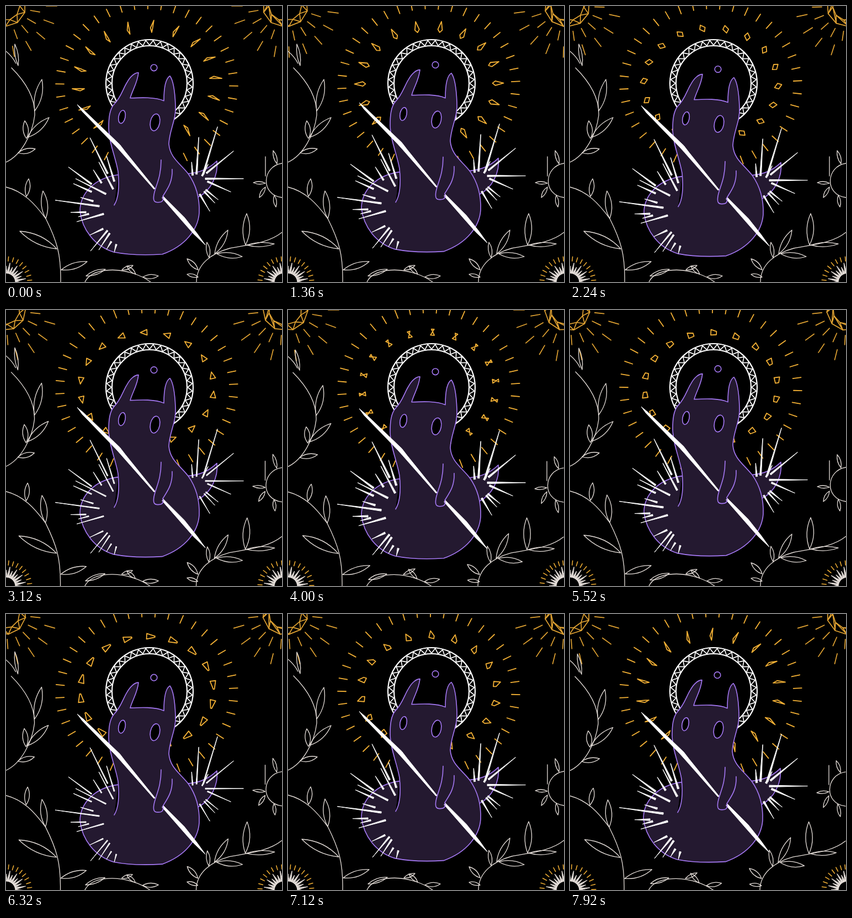
Animation, 500 px wide and 500 px high, one loop 8000 ms. Source, as an HTML page with a canvas:

```html
<!DOCTYPE html>
<html lang="en">
<head>
<meta charset="utf-8">
<title>Horned spirit</title>
<style>
  html, body { margin: 0; width: 100%; height: 100%; overflow: hidden; background: #000; }
  canvas { display: block; width: 500px; height: 500px; }
</style>
</head>
<body>
<canvas id="stage" width="500" height="500"></canvas>
<script>
const ctx = document.getElementById('stage').getContext('2d');
const STEP = 80, STEPS = 100, TAU = Math.PI * 2, DEG = Math.PI / 180;
const GOLD = '#f4b135', WHITE = '#fff', IVORY = '#e6dfda', PURPLE = '#a679f5', FILL = '#241930';

// Each crystal: four corners as [outward, clockwise], reached at the given step.
const crystals = [
  [0, [15, 1], [1, -4], [-7, -1], [1, 0]],
  [17, [14, 0], [-1, -4], [-6, 0], [-1, 4]],
  [39, [0, -6], [0, -6], [-5, 6], [5, 6]],
  [50, [6, -2], [-5, 4], [-5, -3], [6, 3]],
  [69, [5, -5], [-5, -5], [-4, 5], [2, 5]],
  [79, [5, -7], [-5, -7], [-1, 8], [1, 8]],
  [99, [15, 1], [1, -4], [-7, -1], [1, 0]],
  [100, [15, 1], [1, -4], [-7, -1], [1, 0]]
];

const body = new Path2D(`M196 361 C206 345 205 320 203 300 C198 272 187 250 186 222
  C186 205 187 188 196 178 C208 166 212 150 219 139 C225 128 233 121 240 121
  C238 140 230 150 225 167 C245 166 270 165 286 172 C286 155 288 132 297 127
  C303 135 306 155 307 180 C309 205 296 225 295 250 C297 275 315 285 330 304
  C345 325 351 350 350 375 C348 405 325 435 283 450 C250 452 220 451 195 446
  C160 435 138 405 134 372 C134 340 160 312 203 306`);
const tail = new Path2D('M330 304 C355 302 370 293 382 281 C385 305 372 335 347 347');
const arm = new Path2D(`M281 279 C281 312 271 325 268 342 C266 353 269 356 275 356
  C283 356 286 353 284 345 M301 296 C302 320 292 332 284 345`);

const stems = new Path2D(`M0 82 Q12 92 18 104 M10 112 C40 142 53 170 52 198 C48 232 28 270 0 283
  M0 328 C32 336 52 358 72 385 C92 425 100 450 99 500
  M143 500 C155 475 200 474 232 485 Q248 490 262 500
  M345 500 C345 468 372 448 405 439 C440 432 475 430 500 410
  M500 285 C464 290 460 342 500 347 M470 273 L470 308`);
// base x, base y, tip x, tip y, width
const leaves = [
  [22, 108, 16, 69, 6], [52, 190, 65, 133, 13], [37, 240, 34, 208, 10],
  [39, 238, 78, 202, 12], [22, 266, 53, 259, 9],
  [37, 345, 41, 313, 9], [72, 385, 67, 335, 12], [92, 440, 25, 408, 15], [100, 478, 147, 463, 11],
  [180, 477, 145, 489, 8], [210, 478, 230, 470, 6], [235, 486, 219, 471, 6], [248, 491, 276, 489, 8],
  [378, 449, 402, 406, 11], [368, 456, 364, 428, 7], [434, 433, 436, 376, 13],
  [436, 433, 486, 431, 8], [382, 449, 428, 454, 10], [348, 478, 328, 458, 8], [348, 491, 328, 486, 6]
];
const feelers = [
  [491, 286, 484, 262, 6], [470, 321, 448, 320, 5], [470, 328, 459, 347, 6], [486, 343, 489, 364, 6]
];

// outer x, outer y, inner x, inner y
const backSpikes = [
  [152, 239, 184, 304], [182, 272, 196, 318], [168, 283, 194, 332], [158, 297, 173, 321],
  [113, 292, 155, 323], [126, 313, 181, 341], [122, 322, 155, 337], [135, 347, 158, 354],
  [89, 352, 169, 363], [117, 374, 145, 374], [131, 382, 150, 377], [128, 391, 177, 377],
  [152, 415, 176, 404], [153, 444, 184, 407], [168, 442, 188, 412], [182, 441, 191, 427], [196, 446, 200, 432]
];
const tailSpikes = [
  [383, 219, 357, 305], [349, 238, 345, 305], [336, 283, 338, 307], [412, 263, 363, 303],
  [430, 313, 361, 313], [407, 337, 365, 318], [384, 351, 362, 333],
  [378, 357, 359, 336], [369, 372, 351, 341], [366, 287, 355, 308]
];

const wobble = (seed, pose) => pose * 1.3 * Math.sin(seed * 12.9 + pose * 78.2);

function pen(color, width) {
  ctx.strokeStyle = ctx.fillStyle = color;
  ctx.lineWidth = width;
}

function line(points, close) {
  ctx.beginPath();
  points.forEach(([x, y]) => ctx.lineTo(x, y));
  if (close) ctx.closePath();
}

function polar(cx, cy, rx, ry, angle) {
  return [cx + rx * Math.sin(angle), cy - ry * Math.cos(angle)];
}

function ray(cx, cy, inner, outer, angle) {
  line([polar(cx, cy, inner, inner, angle), polar(cx, cy, outer, outer, angle)]);
  ctx.stroke();
}

function spike([x0, y0, x1, y1], width) {
  const len = Math.hypot(x1 - x0, y1 - y0);
  const nx = (y0 - y1) / len * width / 2, ny = (x1 - x0) / len * width / 2;
  line([[x0, y0], [x1 + nx, y1 + ny], [x1 - nx, y1 - ny]], true);
  ctx.fill();
  ctx.lineWidth = 1;
  ctx.stroke();
}

function leaf([x0, y0, x1, y1, width], pose, seed) {
  x1 += wobble(seed, pose);
  y1 += wobble(seed + 5, pose);
  const len = Math.hypot(x1 - x0, y1 - y0);
  const nx = (y0 - y1) / len * width, ny = (x1 - x0) / len * width;
  const mx = x0 + (x1 - x0) * 0.5, my = y0 + (y1 - y0) * 0.5;
  ctx.beginPath();
  ctx.moveTo(x0, y0);
  ctx.quadraticCurveTo(mx + nx, my + ny, x1, y1);
  ctx.quadraticCurveTo(mx - nx * 0.9, my - ny * 0.9, x0, y0);
  ctx.stroke();
}

function drawCorners(step, pose) {
  const spin = step * 4 * DEG;
  for (const cx of [-1, 502]) {
    const dir = cx < 0 ? 1 : -1;
    pen('#e0a232', 1.7);
    const zigzag = [], rim = [], core = [];
    for (let i = 0; i < 10; i++) {
      const a = dir * (i * 36 * DEG + spin);
      rim.push(polar(cx, 0, 37, 37, a));
      core.push(polar(cx, 0, 26, 26, a + 18 * DEG));
      zigzag.push(rim[i], core[i]);
    }
    for (const shape of [rim, core, zigzag]) { line(shape, true); ctx.stroke(); }
    for (let i = 0; i < 36; i++) {
      const long = i % 2;
      ray(cx, 0, long ? 74 : 46, long ? 93 : 63, dir * (i * 10 * DEG + spin));
    }
  }
  for (const cx of [0, 503]) {
    for (let i = 0; i < 32; i++) {
      const a = i * TAU / 32 + wobble(i, pose) * 0.02;
      pen(GOLD, 1.5);
      ray(cx, 501, 39, 47, a + 0.1);
      pen(IVORY, 1);
      spike([...polar(cx, 501, i % 2 ? 36 : 30, i % 2 ? 36 : 30, a), ...polar(cx, 501, 17, 17, a)], 3.5);
    }
  }
}

function drawPlants(pose) {
  pen(IVORY, 1.3);
  ctx.save();
  ctx.translate(-pose * 0.5, pose * 0.6);
  ctx.stroke(stems);
  leaves.concat(feelers).forEach((item, i) => leaf(item, pose, i));
  ctx.restore();
}

function drawSun(step) {
  pen(GOLD, 1.8);
  for (let i = 0; i < 40; i++) {
    const a = (270.7 + i * 9 + step * 4.05) * DEG;
    line([polar(255, 143, 150, 138, a), polar(255, 143, 165, 153, a)]);
    ctx.stroke();
  }

  const next = crystals.findIndex(c => c[0] > step);
  const from = crystals[next - 1], to = crystals[next];
  const mix = (step - from[0]) / (to[0] - from[0]);
  const drift = -1.2 - 3.2 * Math.sin(TAU * (step / STEPS - 0.05));
  for (let i = 0; i < 18; i++) {
    const a = (5 + i * 20 + step * 4 + drift) * DEG;
    const [x, y] = polar(255.5, 140.5, 121, 100, a);
    line([1, 2, 3, 4].map(n => {
      const out = from[n][0] + (to[n][0] - from[n][0]) * mix;
      const side = from[n][1] + (to[n][1] - from[n][1]) * mix;
      return [x + Math.sin(a) * out + Math.cos(a) * side, y - Math.cos(a) * out + Math.sin(a) * side];
    }), true);
    ctx.stroke();
  }
}

function drawHalo() {
  pen(WHITE, 2.2);
  for (const r of [79, 68]) {
    ctx.beginPath();
    ctx.arc(260, 140, r, 0, TAU);
    ctx.stroke();
  }
  pen(WHITE, 1.7);
  line(Array.from({ length: 72 }, (_, i) => polar(260, 140, i % 2 ? 78 : 69, i % 2 ? 78 : 69, i * TAU / 72)), true);
  ctx.stroke();
}

function outlined(path, fill) {
  ctx.fillStyle = fill;
  ctx.fill(path);
  ctx.stroke(path);
}

function oval(x, y, rx, ry, tilt) {
  const path = new Path2D();
  path.ellipse(x, y, rx, ry, tilt, 0, TAU);
  outlined(path, '#000');
}

function drawSpirit(step, pose) {
  const bob = 4.5 * Math.sin(TAU * (step + 0.7) / 25) - 1;
  const sway = step % 8 > 0 && step % 8 < 4 ? -1 : 0;
  const thick = [2.6, 1.6, 3][pose];

  ctx.save();
  ctx.translate(sway, bob);
  pen(PURPLE, 1.6);
  outlined(tail, FILL);
  outlined(body, FILL);
  oval(210, 201, 6, 12, 0.2);
  oval(270, 211, 8.5, 15.5, 0.2);
  oval(268, 112, 5.8, 5.8, 0);
  ctx.restore();

  ctx.save();
  ctx.translate(0, bob * 0.7);
  pen(WHITE, 1);
  line([[129, 179], [140, 188], [206, 251], [216, 264], [270, 331], [268, 332], [208, 264], [199, 254], [138, 191]], true);
  ctx.fill();
  ctx.stroke();
  line([[285, 345], [323, 383], [346, 412], [361, 433], [340, 413], [317, 387], [283, 348]], true);
  ctx.fill();
  ctx.stroke();
  ctx.restore();

  ctx.save();
  ctx.translate(0, bob);
  pen(PURPLE, 1.6);
  ctx.stroke(arm);
  pen(WHITE, 1);
  backSpikes.concat(tailSpikes).forEach(s => spike(s, thick));
  ctx.restore();
}

function draw(now) {
  const step = Math.floor(now / STEP) % STEPS;
  const pose = [0, 2, 0, 1][(step >> 1) % 4];
  ctx.fillStyle = '#000';
  ctx.fillRect(0, 0, 500, 500);
  drawSun(step);
  drawCorners(step, pose);
  drawPlants(pose);
  drawHalo();
  drawSpirit(step, pose);
}

ctx.lineJoin = ctx.lineCap = 'round';
const start = performance.now();
function tick() {
  draw(performance.now() - start);
  requestAnimationFrame(tick);
}
tick();
</script>
</body>
</html>
```
